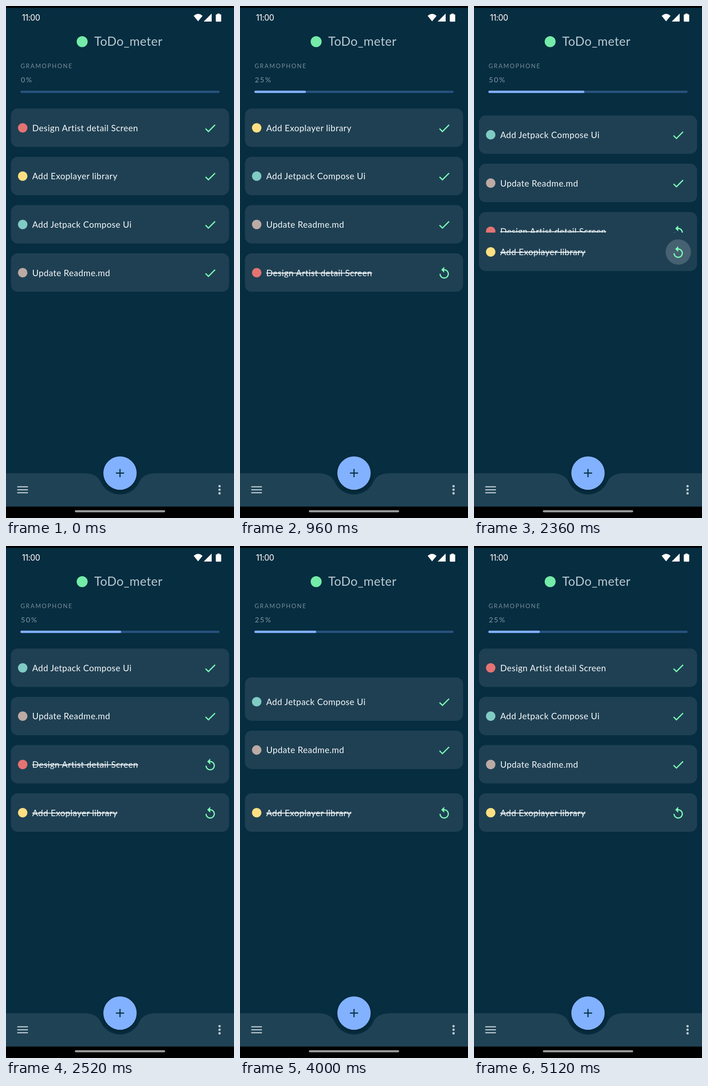
Animation of 500x1120 px, one loop 6080 ms. Source, as an HTML page:

```html
<!DOCTYPE html>
<html lang="en">
<head>
<meta charset="utf-8">
<title>Task list</title>
<style>
  html, body { margin: 0; width: 100%; height: 100%; overflow: hidden; background: #000; }
  svg { display: block; width: 100vw; height: 100vh; }
  text { font-family: Lato, "Open Sans", sans-serif; }
  .task { font-size: 19px; letter-spacing: .45px; fill: #f4f8fa; }
  .done { text-decoration: line-through; }
  .clock { font: 400 18px Inter, Roboto, sans-serif; letter-spacing: -.6px; fill: #fff; }
  .title { font-size: 27px; letter-spacing: .4px; fill: #b8cad3; }
  .label { font-size: 13px; letter-spacing: 2px; fill: #788f9a; }
  .percent { font-size: 16px; letter-spacing: 2px; fill: #8299a4; }
</style>
</head>
<body>
<svg id="stage" viewBox="0 0 500 1120" preserveAspectRatio="none">
  <defs>
    <filter id="shadow" x="-30%" y="-30%" width="160%" height="160%">
      <feDropShadow dx="0" dy="4" stdDeviation="4" flood-opacity=".28"/>
    </filter>
  </defs>
  <rect width="500" height="1120"/>
  <rect y="4" width="500" height="1091" fill="#062d40"/>

  <text class="clock" x="35" y="32">11:00</text>
  <g fill="#fff">
    <path d="M411.5 21.5Q421.5 13 431 21.5L421.3 33.5Z"/>
    <path d="M451 16.5V34H433.5Z"/>
    <path d="M463.5 16.5h5v1.7h2q1.5 0 1.5 1.5v13q0 1.5-1.5 1.5h-9q-1.5 0-1.5-1.5v-13q0-1.5 1.5-1.5h2z"/>
  </g>

  <circle cx="167" cy="78" r="12" fill="#74eba8"/>
  <text class="title" x="193.5" y="87">ToDo_meter</text>
  <text class="label" x="32" y="136">GRAMOPHONE</text>
  <text class="percent" id="percent" x="32.5" y="167">0%</text>
  <g stroke-width="5" stroke-linecap="round">
    <path d="M34 187.7H466" stroke="#28527e"/>
    <path id="bar" stroke="#82b1ff"/>
  </g>

  <g id="list"></g>

  <path fill="#1f4254" d="M0 1022H168C188 1022 201 1027 207.5 1041A46.5 46.5 0 0 0 292.5 1041C299 1027 312 1022 332 1022H500V1095H0Z"/>
  <circle cx="250" cy="1021.7" r="36.5" fill="#82b1ff" filter="url(#shadow)"/>
  <path d="M241 1021.7h18M250 1012.7v18" stroke="#07304a" stroke-width="2.5"/>
  <path d="M24.7 1051.8h23.4M24.7 1058.3h23.4M24.7 1064.8h23.4" stroke="#b9c8d0" stroke-width="2.5"/>
  <g fill="#b9c8d0">
    <circle cx="468.3" cy="1050.3" r="2.6"/>
    <circle cx="468.3" cy="1058.1" r="2.6"/>
    <circle cx="468.3" cy="1065.9" r="2.6"/>
  </g>
  <rect x="151" y="1103" width="198" height="4.5" rx="2.25" fill="#9c9c9c"/>
</svg>
<script>
const LOOP = 6080, TOP = 266.3, PITCH = 105.6;
const CHECK = 'M9 16.17L4.83 12l-1.42 1.41L9 19 21 7l-1.41-1.41z';
const REPLAY = 'M12 5V1L7 6l5 5V7c3.31 0 6 2.69 6 6s-2.69 6-6 6-6-2.69-6-6H4c0 4.42 3.58 8 8 8s8-3.58 8-8-3.58-8-8-8z';

const tasks = [
  ['Design Artist detail Screen', '#e57373'],
  ['Add Exoplayer library', '#ffdf82'],
  ['Add Jetpack Compose Ui', '#80cbc4'],
  ['Update Readme.md', '#bcaaa4']
];

// Each state lists the task order; the last `done` tasks are struck through.
const states = [
  { order: [0, 1, 2, 3], done: 0 },
  { order: [1, 2, 3, 0], done: 1 },
  { order: [2, 3, 0, 1], done: 2 },
  { order: [0, 2, 3, 1], done: 1 }
];

// A tap: finger down, first visible moment, data change, task, ripple origin.
const taps = [
  { press: 540, show: 560, commit: 640, task: 0, dx: 0, dy: 3 },
  { press: 2130, show: 2200, commit: 2200, task: 1, dx: 0, dy: 3.5 },
  { press: 3810, show: 3840, commit: 3880, task: 0, dx: 4, dy: 4 }
];
const LIST_DELAY = 20, SETTLE = 300;

const clamp = v => Math.max(0, Math.min(1, v));
const damped = s => 1 - (1 + 24 * s) * Math.exp(-24 * s);
const spring = ms => damped(Math.max(0, Math.min(ms, SETTLE)) / 1000) / damped(SETTLE / 1000);
const mix = (a, b, p) => a + (b - a) * p;
const $ = id => document.getElementById(id);
const list = $('list');

function set(el, attrs) {
  for (const key in attrs) el.setAttribute(key, attrs[key]);
}
function make(tag, attrs, parent) {
  const el = document.createElementNS('http://www.w3.org/2000/svg', tag);
  set(el, attrs);
  parent.appendChild(el);
  return el;
}

const rows = tasks.map(([name, color]) => {
  const g = make('g', {}, list);
  make('rect', { x: 10.8, y: -42, width: 478.4, height: 84, rx: 15, fill: '#1f4053' }, g);
  make('circle', { cx: 36.6, cy: 0.3, r: 10.4, fill: color }, g);
  const label = make('text', { class: 'task', x: 57.5, y: 7.5 }, g);
  label.textContent = name;
  const ripple = make('circle', { fill: '#fff' }, g);
  const icon = make('path', { fill: '#7cffb8' }, g);
  return { g, label, ripple, icon };
});

function countCommits(t, delay) {
  return taps.filter(tap => t >= tap.commit + delay).length;
}

function drawRipple(tap, t) {
  const age = t - tap.press;
  const alpha = 0.18 * clamp(age / 75) * clamp(1 - (age - 225) / 150);
  const grow = clamp(age / 225) ** 3;
  set(rows[tap.task].ripple, {
    cx: 448 + tap.dx * (1 - grow), cy: 0.5 + tap.dy * (1 - grow),
    r: 19.7 + 8 * grow, opacity: alpha
  });
}

let drawnState = -1;
function arrange(index) {
  if (index === drawnState) return;
  drawnState = index;
  const { order, done } = states[index];
  order.forEach((task, slot) => {
    const { g, label, icon } = rows[task];
    const isDone = slot >= order.length - done;
    list.appendChild(g);
    label.setAttribute('class', isDone ? 'task done' : 'task');
    set(icon, {
      d: isDone ? REPLAY : CHECK,
      transform: `translate(432.3 ${isDone ? -13.8 : -14.4}) scale(1.29)`
    });
  });
}

function draw(t) {
  const data = countCommits(t, 0);
  const from = states[Math.max(0, data - 1)].done / 4;
  const to = states[data].done / 4;
  const p = data ? spring(t - taps[data - 1].commit) : 1;
  const progress = mix(from, to, p);
  $('percent').textContent = to * 100 + '%';
  set($('bar'), { d: `M34 187.7H${34 + 432 * progress}`, opacity: progress > 0 ? 1 : 0 });

  const shown = countCommits(t, LIST_DELAY);
  arrange(shown);
  const move = shown ? spring(t - taps[shown - 1].commit - LIST_DELAY) : 1;
  const before = states[Math.max(0, shown - 1)].order;
  const after = states[shown].order;
  rows.forEach((row, i) => {
    const slot = mix(before.indexOf(i), after.indexOf(i), move);
    set(row.g, { transform: `translate(0 ${TOP + PITCH * slot})` });
    set(row.ripple, { opacity: 0 });
  });
  const tap = taps.filter(tap => t >= tap.show).pop();
  if (tap) drawRipple(tap, t);
}

const start = performance.now();
function tick() {
  draw((performance.now() - start) % LOOP);
  requestAnimationFrame(tick);
}
tick();
</script>
</body>
</html>
```
